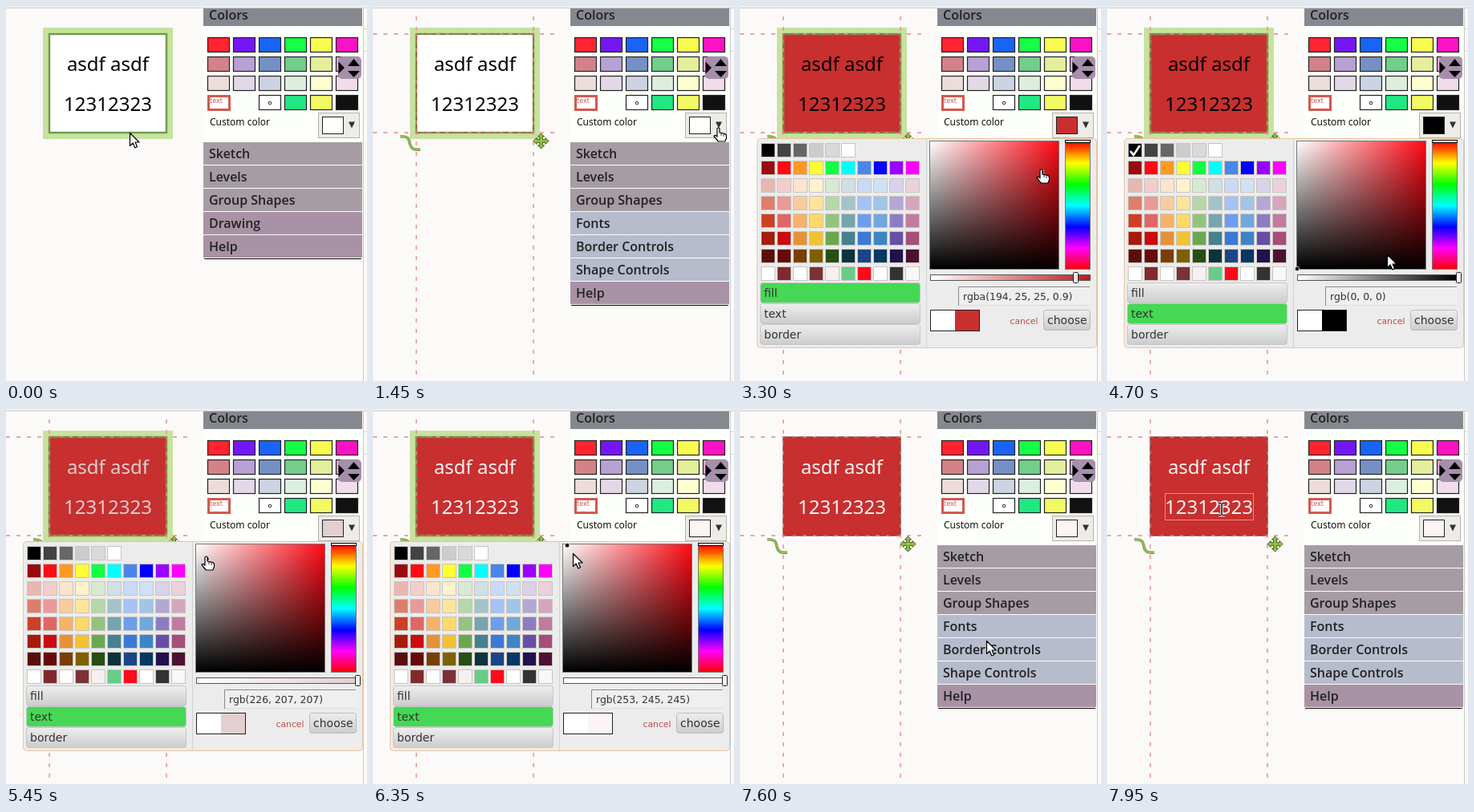
Write an HTML page that moves like this. It is 450 by 468 pixels and loops after 8000 ms.

```html
<!DOCTYPE html>
<html>
<head>
<meta charset="utf-8">
<title>Color picker demo</title>
<style>
html, body { margin: 0; width: 100%; height: 100%; overflow: hidden; background: #fbfaf8; }
svg { display: block; }
text { white-space: pre; }
.shape { font: 24px "Noto Sans", "Open Sans", sans-serif; }
.side { font: 600 16px "Open Sans", "Noto Sans", sans-serif; fill: #222; }
.note { font: 12px "Noto Sans", sans-serif; fill: #111; }
.pick { font: 14px "DejaVu Sans", sans-serif; fill: #333; }
</style>
</head>
<body>
<svg id="stage" width="450" height="468" viewBox="0 0 450 468">
  <defs>
    <linearGradient id="sat"><stop stop-color="#fff"/><stop offset="1" stop-color="#fff" stop-opacity="0"/></linearGradient>
    <linearGradient id="val" x2="0" y2="1"><stop stop-color="#000" stop-opacity="0"/><stop offset="1"/></linearGradient>
    <linearGradient id="btn" x2="0" y2="1"><stop stop-color="#eee"/><stop offset="1" stop-color="#ccc"/></linearGradient>
    <linearGradient id="press" x2="0" y2="1"><stop stop-color="#bbb"/><stop offset="1" stop-color="#d2d2d2"/></linearGradient>
    <linearGradient id="hue" x2="0" y2="1"></linearGradient>
  </defs>
  <g id="scene"></g>
</svg>
<script>
const LOOP = 8000, STEP = 50;
const OPEN = 1650, FILL = 2300, TO_TEXT = 4450, TEXT = 5250, CLOSE = 7500;
const scene = document.getElementById('scene');

document.getElementById('hue').innerHTML = ['f00', 'ff0', '0f0', '0ff', '00f', 'f0f', 'f00']
  .map((c, i) => `<stop offset="${i / 6}" stop-color="#${c}"/>`).join('');

const rect = (x, y, w, h, fill, more = '') =>
  `<rect x="${x}" y="${y}" width="${w}" height="${h}" fill="${fill}" ${more}/>`;
const box = (x, y, w, h, fill, line, more = '') =>
  rect(x + .5, y + .5, w - 1, h - 1, fill, `stroke="${line}" ${more}`);
const path = (d, fill, more = '') => `<path d="${d}" fill="${fill}" ${more}/>`;
const text = (x, y, s, cls, more = '') => `<text x="${x}" y="${y}" class="${cls}" ${more}>${s}</text>`;
const grid = (rows, cell) =>
  rows.map((row, r) => row.split(' ').map((c, i) => cell(c, i, r)).join('')).join('');

const palette = [
  '000 434343 666 ccc d9d9d9 fff',
  '980a10 ff0a14 ff9922 ffff33 11ff44 00ffff 4a86e8 0000ff 9900ff ff00ff',
  'e6b8af f4cccc fce5cd fff2cc d9ead3 d0e0e3 c9daf8 cfe2f3 d9d2e9 ead1dc',
  'dd7e6b ea9999 f9cb9c ffe599 b6d7a8 a2c4c9 a4c2f4 9fc5e8 b4a7d6 d5a6bd',
  'cc4125 e06666 f6b26b ffd966 93c47d 76a5af 6d9eeb 6fa8dc 8e7cc3 c27ba0',
  'a61c0a cc0a10 e69138 f1c232 6aa84f 45818e 3c78d8 3d85c6 674ea7 a64d79',
  '5b0f0a 660a0a 783f04 7f6000 274e13 0c343d 1c4587 073763 20124d 4c1130',
  'fff 802a2e fdfdfd 7b3236 f7f0ef 66cc88 ff0a1a fff 333 f8f8f8'
];
const quick = [
  'ff2430 7417f5 1964f5 14ff46 f8fb50 fb12c4',
  'd28288 b7a0d3 7490c5 72ce8a e5ee9b f0a8d8',
  'ecdcda e2d8e8 ccd3e2 dceede fdffd0 f0dcea',
  'none none fff 22e882 f2f963 111'
];

// Pointer: time, x, y; eased between stops
const track = [
  [0, 154, 158], [400, 154, 158], [450, 194, 159], [800, 194, 159], [1450, 431, 155],
  [1650, 431, 155], [2150, 310, 240], [2250, 310, 240], [2700, 372, 230], [2950, 372, 230],
  [3300, 376.4, 207], [3750, 376.4, 207], [4300, 70, 384], [4400, 70, 384], [4550, 190, 416],
  [4700, 349, 310], [4750, 349, 310], [5200, 262, 212], [5250, 262, 212], [5450, 250.45, 187.1],
  [5750, 242.06, 170.25], [6300, 242.06, 170.25], [6650, 374, 343], [6950, 374, 343],
  [7300, 415, 398], [7450, 415, 398], [7800, 141, 122], [7950, 143, 125], [LOOP, 143, 125]
];
const kinds = [[0, 'arrow'], [1300, 'hand'], [OPEN, 'arrow'], [FILL, 'hand'], [3800, 'arrow'],
  [4250, 'hand'], [4500, 'arrow'], [TEXT, 'hand'], [6200, 'arrow'], [7200, 'hand'],
  [CLOSE, 'arrow'], [7750, 'beam']];

function pointer(t) {
  const i = track.findIndex(k => k[0] > t);
  const [a, x, y] = track[i - 1], [b, X, Y] = track[i];
  const u = (t - a) / (b - a), e = u * u * (3 - 2 * u);
  return [x + (X - x) * e, y + (Y - y) * e];
}

const ink = 'stroke="#000" stroke-width="1.2" stroke-linejoin="round"';
const cursors = {
  arrow: path('M.5 .5v16l3.7-3.5 2.6 6 2.8-1.2-2.5-5.8h5z', '#fff', ink),
  hand: path('M-2-2q1.5-2 3 0v5l6 1.3q2.5 .7 2.5 2.7v3l-1.7 4h-8.5l-5.3-6.5q.8-2.5 4 .5z', '#fff', ink) +
    path('M3 4v3M6 5v3', 'none', 'stroke="#000" stroke-width=".8"'),
  beam: path('M-4-7.5h8M0-7.5v15M-4 7.5h8', 'none', 'stroke="#fff" stroke-width="3.4"') +
    path('M-4-7.5h3.5M.5-7.5H4M0-7v14M-4 7.5h3.5M.5 7.5H4', 'none', 'stroke="#000" stroke-width="1.4"')
};

// Colour under a point of the saturation/value square
function colorAt([x, y]) {
  const s = (x - 237) / 160, v = 255 * (1 - (y - 169) / 159);
  const other = Math.round(v * (1 - s));
  return [Math.round(v), other, other].join(', ');
}

function shape(t, fill, ink, p) {
  const halo = t < 700 || (t >= 900 && t < 7600);
  const hover = p[0] > 72 && p[0] < 182 && p[1] > 105 && p[1] < 139;
  const label = (y, s) => text(127, y, s, 'shape', `text-anchor="middle" fill="${ink}"`);
  return (halo ? rect(46, 27, 162, 139, '#c7e29f') : '') +
    rect(54, 35, 146, 123, '#fff') +
    rect(54, 35, 146, 123, fill, halo ? 'stroke="#6f9a48" stroke-width="2.4"' : 'stroke="#433"') +
    label(81, 'asdf asdf') + label(131, '12312323') +
    (hover ? box(72, 105, 111, 34, 'none', '#f08a84') : '');
}

function handles() {
  const arm = 'M0-9.5l4 4h-2.2v3.7h3.7V-4l4 4-4 4V1.8H1.8v3.7H4l-4 4-4-4h2.2V1.8h-3.7V4l-4-4 4-4v2.2h3.7v-3.7H-4z';
  const curl = 'M34 163c10-1 11 3 12 9s6 8 13 7';
  return path('M54 13V468M200 13V468M0 35H228M0 158H228', 'none', 'stroke="#e58a8c" stroke-width="1.4" stroke-dasharray="5 8"') +
    path('M54 35H200V158H54z', 'none', 'stroke="#c0453c" stroke-width="1.2" stroke-dasharray="5 5"') +
    path(curl, 'none', 'stroke="#6d8450" stroke-width="3.4"') +
    path(curl, 'none', 'stroke="#93c83e" stroke-width="1.8"') +
    `<g transform="translate(209.5 168.5)">${path(arm, '#93c83e', 'stroke="#3f5220"')}</g>`;
}

function sidebar(t, color) {
  const gray = '#a59da3', blue = '#b6bccb', plum = '#a992a5';
  const items = [['Sketch', gray], ['Levels', gray], ['Group Shapes', gray],
    ...(t < 700 ? [['Drawing', plum]] : [['Fonts', blue], ['Border Controls', blue], ['Shape Controls', blue]]),
    ['Help', plum]];
  const end = 170 + 29 * items.length;
  return rect(246, 3, 198, end - 3, '#fdfffa') + rect(246, 3, 198, 22, '#868890') +
    text(253, 17, 'Colors', 'side') +
    grid(quick, (c, i, r) => c == 'none' ? '' :
      box(251 + 32 * i, 39 + 24 * r, 28, 19, '#' + c, '#222', 'stroke-width="1.2"')) +
    rect(252.5, 112.5, 26, 17, '#fff', 'stroke="#d2594f" stroke-width="3"') +
    text(254, 121, 'text', 'pick', 'style="font-size:8px;fill:#c4564c"') +
    '<circle cx="329" cy="121" r="1.8" fill="none" stroke="#222"/>' +
    rect(414, 63, 29, 28, '#a68fab', 'rx="5"') +
    path('M414.5 69.5v15l7.5-7.5zM426 75h15l-7.5-9zM426 81h15l-7.5 8z', '#000') +
    text(254, 149, 'Custom color', 'note') +
    box(389, 133, 52, 32, '#eeece7', '#b5b2ac') +
    box(394, 138, 27, 22, '#fff', '#222') + rect(395, 139, 25, 20, color) +
    path('M427 144.5h8l-4 8z', '#333') +
    items.map(([name, c], i) => rect(246, 170 + 29 * i, 198, 28, c) + text(253, 190 + 29 * i, name, 'side')).join('') +
    rect(247, end, 196, 1, '#000');
}

function picker(t, dot, color, rgb, alpha) {
  const active = t < TO_TEXT ? 0 : 1, knob = 238 + 200 * alpha;
  const black = t >= TO_TEXT && t < TEXT;
  const shade = fill => rect(237, 169, 160, 159, fill);
  return box(21, 165, 424, 262, '#ececec', '#eac5a2', 'rx="4"') +
    rect(232, 166, 1, 260, '#d2d2d2') +
    grid(palette, (c, i, r) => box(26 + 20 * i, 171 + 22 * r, 18, 18, '#' + c, '#c9c5c0')) +
    (black ? path('M29 181l4 5 8-12', 'none', 'stroke="#fff" stroke-width="2.6"') : '') +
    ['fill', 'text', 'border'].map((s, i) =>
      box(25, 345 + 26 * i, 200, 26, i == active ? '#44d854' : 'url(#btn)', '#c6c6c6', 'rx="3"') +
      text(30, 363 + 26 * i, s, 'pick')).join('') +
    shade('#ff0a14') + shade('url(#sat)') + shade('url(#val)') +
    box(236, 168, 162, 161, 'none', '#777') +
    `<circle cx="${dot[0]}" cy="${dot[1]}" r="2.7" stroke="#fff" stroke-width=".7"/>` +
    box(405, 169, 32, 160, 'url(#hue)', '#777') + box(405, 167, 32, 4, '#fff', '#000') +
    `<linearGradient id="alpha"><stop stop-color="rgb(${rgb})" stop-opacity="0"/><stop offset="1" stop-color="rgb(${rgb})"/></linearGradient>` +
    box(237, 335, 200, 8, '#fff', '#555') + rect(238, 336, 198, 6, 'url(#alpha)') +
    box(Math.round(knob) - 3, 332, 7, 14, '#f4f4f4', '#222', 'rx="1"') +
    rect(272, 350, 165, 24, '#efefef') + path('M272.5 374V350.5H436', 'none', 'stroke="#8a8a8a"') +
    path('M273 373.5H436', 'none', 'stroke="#ddd"') +
    text(278, 367, alpha < 1 ? `rgba(${rgb}, ${alpha})` : `rgb(${rgb})`, 'pick', 'style="font-size:12.4px"') +
    box(237, 379, 62, 27, '#fff', '#222') + rect(268, 380, 30, 25, color) +
    text(336.5, 397, 'cancel', 'pick', 'style="font-size:10.8px;fill:#c04a48"') +
    box(378, 379, 59, 26, t < 7250 ? 'url(#btn)' : 'url(#press)', t < 7250 ? '#bbb' : '#888', 'rx="3"') +
    text(383, 397, 'choose', 'pick');
}

function draw(t) {
  const p = pointer(t);
  const fillDot = t < FILL ? [237, 169] : pointer(Math.min(t, 3300));
  const textDot = t < TEXT ? [237, 328] : pointer(Math.min(t, 5750));
  const onText = t >= TO_TEXT;
  const fill = `rgba(${colorAt(fillDot)}, 0.9)`, ink = `rgb(${colorAt(textDot)})`;
  const dot = onText ? textDot : fillDot, color = onText ? ink : fill;
  const kind = kinds.filter(k => k[0] <= t).pop()[1];
  scene.innerHTML = rect(0, 0, 450, 468, '#fbfaf8') +
    shape(t, fill, ink, p) + (t >= 650 ? handles() : '') +
    rect(0, 0, 450, 2, '#f1f0ee') + rect(0, 2, 450, 1, '#cfcdca') +
    rect(445, 3, 1, 465, '#c9c9c9') + rect(446, 28, 4, 1, '#d4d4d4') + rect(446, 56, 4, 1, '#d4d4d4') +
    sidebar(t, color) +
    (t >= OPEN && t < CLOSE ? picker(t, dot, color, colorAt(dot), onText ? 1 : 0.9) : '') +
    `<g transform="translate(${Math.round(p[0])} ${Math.round(p[1])})">${cursors[kind]}</g>`;
}

let last = -1;
function tick(now) {
  const t = Math.floor(now % LOOP / STEP) * STEP;
  if (t !== last) draw(last = t);
  requestAnimationFrame(tick);
}
draw(0);
requestAnimationFrame(tick);
</script>
</body>
</html>
```
